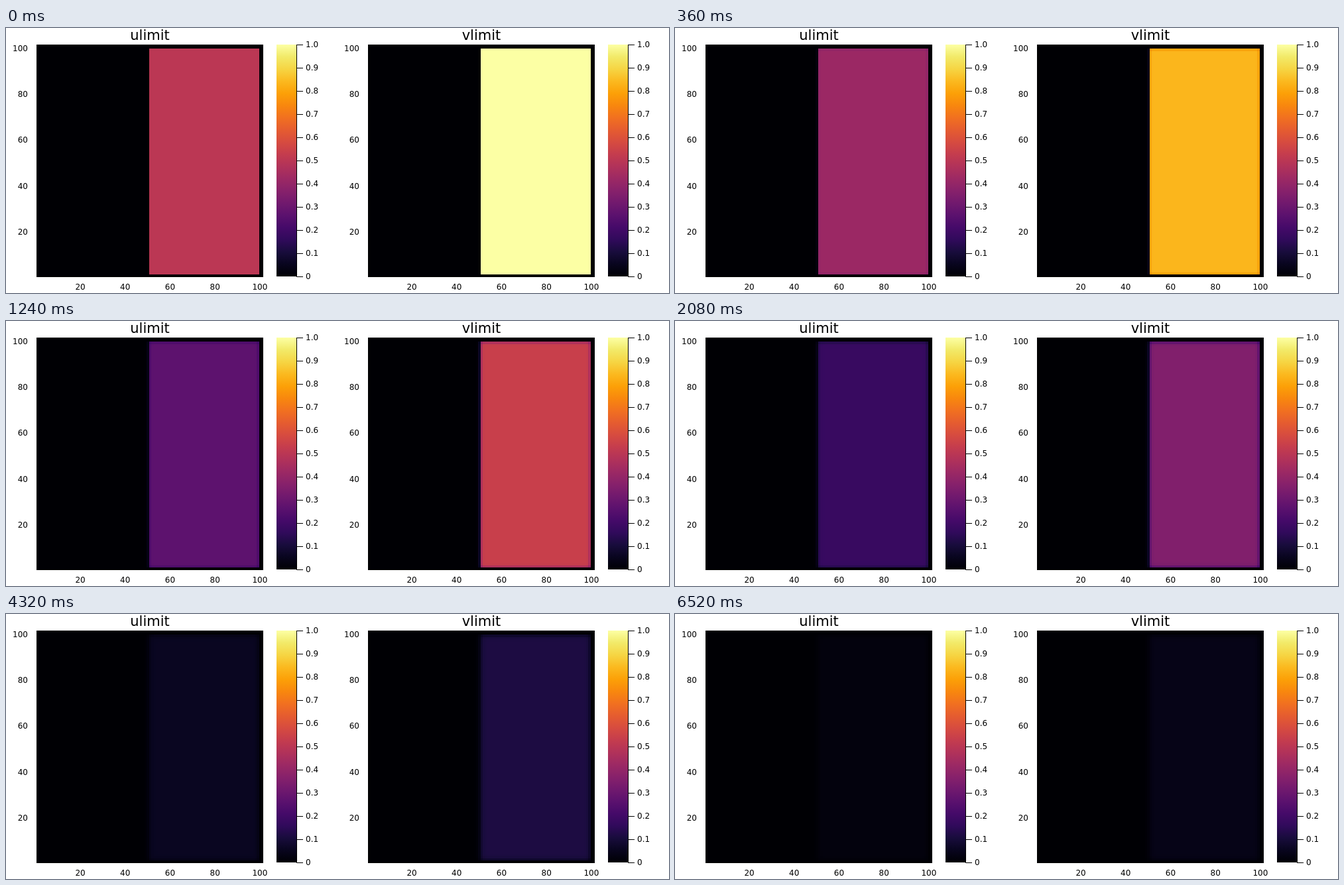
Animation, 1000 px wide and 400 px high, one loop 8040 ms. Source, as an HTML page with a canvas:

```html
<!DOCTYPE html>
<html lang="en">
<head>
<meta charset="utf-8">
<title>Heatmaps</title>
<style>
  html, body { margin: 0; width: 100%; height: 100%; overflow: hidden; background: #fff; }
  canvas, svg { position: absolute; left: 0; top: 0; display: block; }
  text { font-family: "DejaVu Sans", sans-serif; font-size: 12px; fill: #000; }
  .title { font-size: 21px; }
</style>
</head>
<body>
<canvas id="heat" width="1000" height="400"></canvas>
<svg id="axes" width="1000" height="400" viewBox="0 0 1000 400"></svg>
<script>
const LOOP = 8040, TICK = 40;
const DECAY = 0.5, SPREAD = 0.12;   // per second
const CELLS = 101, LAST = 99;
const STEPS = [0, 40, 80, 120, 160, 200, 240, 280, 360, 440, 520, 600, 680, 800,
  920, 1080, 1240, 1400, 1560, 1720, 1880, 2080, 2320, 2600, 2880, 3240, 3560,
  3920, 4320, 4800, 5400, 6520];
const INFERNO = ['000004', '08051e', '180c3c', '300a5b', '450a69', '5b116e', '71196e',
  '87216b', '9c2964', 'b1325a', 'c43c4e', 'd64b40', 'e55c30', 'f17020', 'f8870e',
  'fca007', 'fbb91f', 'f6d543', 'f2ea69', 'fcffa4']
  .map(h => [0, 2, 4].map(i => parseInt(h.slice(i, i + 2), 16)));
const PANELS = [
  { x: 0, title: 'ulimit', peak: 0.5 },
  { x: 500, title: 'vlimit', peak: 1 }
];

const ctx = document.getElementById('heat').getContext('2d');
const svg = document.getElementById('axes');

function color(v) {
  const p = Math.min(Math.max(v, 0), 1) * (INFERNO.length - 1);
  const i = Math.min(Math.floor(p), INFERNO.length - 2);
  const mix = INFERNO[i].map((a, k) => Math.round(a + (INFERNO[i + 1][k] - a) * (p - i)));
  return `rgb(${mix})`;
}

// Pixel edges of cell columns (from the left) and rows (from the bottom)
const colEdge = n => 46 + Math.ceil(n * 342 / CELLS);
const rowEdge = n => Math.round(375.5 - n * 351 / CELLS);

// One-dimensional diffusion of a block, held at zero at both ends
function profiles(first) {
  let line = Array.from({ length: CELLS + 1 }, (_, i) => +(i >= first && i <= LAST));
  const out = [];
  const d = SPREAD * TICK / 1000;
  for (let t = 0; t < LOOP; t += TICK) {
    out.push(line);
    const prev = line;
    line = prev.map((a, i) => i < 2 || i > LAST ? 0 : a + d * (prev[i - 1] - 2 * a + prev[i + 1]));
  }
  return out;
}
const across = profiles(51), upward = profiles(2);

function drawHeat(time) {
  const n = time / TICK;
  const fade = Math.exp(-DECAY * time / 1000);
  for (const { x, peak } of PANELS) {
    for (let i = 46; i <= LAST; i++) {
      const left = x + colEdge(i - 1), width = x + colEdge(i) - left;
      for (let j = 2; j <= LAST; j++) {
        const top = rowEdge(j);
        ctx.fillStyle = color(peak * fade * across[n][i] * upward[n][j]);
        ctx.fillRect(left, top, width, rowEdge(j - 1) - top);
      }
    }
  }
}

function label(str, x, y, anchor, cls) {
  const el = document.createElementNS('http://www.w3.org/2000/svg', 'text');
  el.textContent = str;
  el.setAttribute('x', x);
  el.setAttribute('y', y);
  el.setAttribute('text-anchor', anchor);
  if (cls) el.setAttribute('class', cls);
  svg.append(el);
}

function drawPanel({ x, title }) {
  ctx.fillStyle = color(0);
  ctx.fillRect(x + 46, 25, 342, 350);
  const ramp = ctx.createLinearGradient(0, 375, 0, 25);
  INFERNO.forEach((c, i) => ramp.addColorStop(i / (INFERNO.length - 1), `rgb(${c})`));
  ctx.fillStyle = ramp;
  ctx.fillRect(x + 408, 25, 30, 350);

  ctx.fillStyle = '#000';
  ctx.fillRect(x + 46, 375, 342, 1);
  ctx.fillRect(x + 46, 25, 1, 350);
  ctx.fillRect(x + 438, 25, 1, 350);

  label(title, x + 217, 18, 'middle', 'title');
  for (let v = 20; v <= 100; v += 20) {
    label(v, x + 46 + (v - 0.5) * 342 / CELLS, 394.5, 'middle');
    label(v, x + 33, 379.4 - (v - 0.5) * 350 / CELLS, 'end');
  }
  for (let k = 0; k <= 10; k++) {
    const y = 375 - 35 * k;
    ctx.fillRect(x + 438, y, 10, 1);
    label(k ? (k / 10).toFixed(1) : '0', x + 452, y + 4.4, 'start');
  }
}

PANELS.forEach(drawPanel);

const start = performance.now();
let shown = -1;
function frame() {
  const t = (performance.now() - start) % LOOP;
  const step = STEPS.filter(s => s <= t).pop();
  if (step !== shown) drawHeat(shown = step);
  requestAnimationFrame(frame);
}
frame();
</script>
</body>
</html>
```
